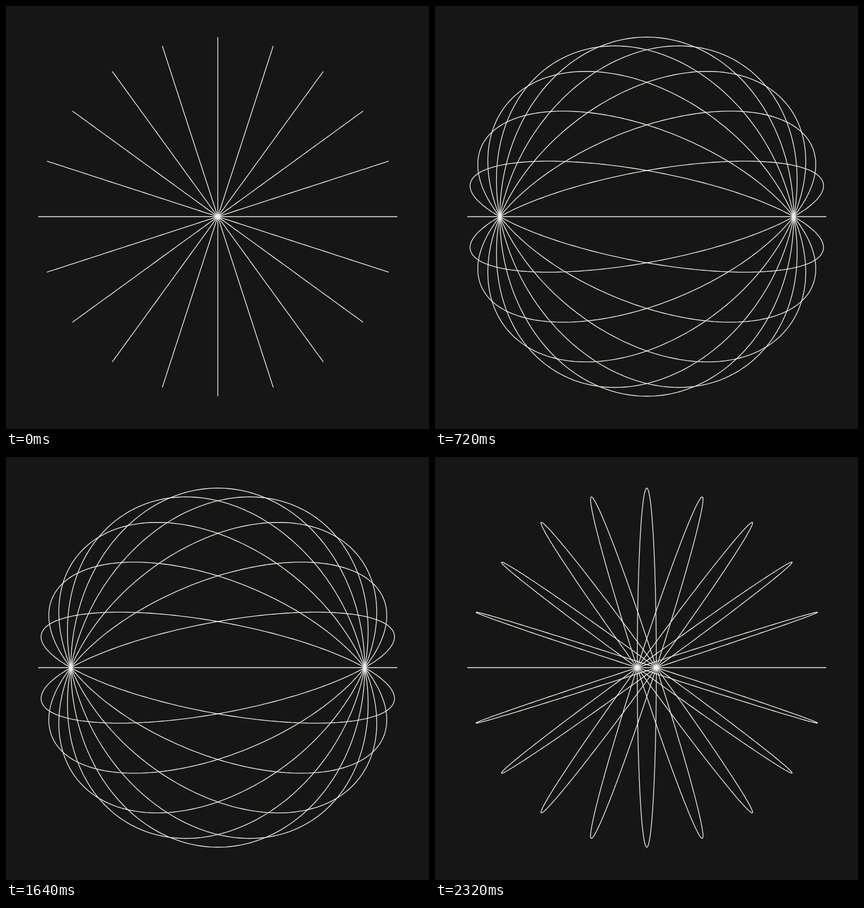
An HTML page with a canvas that plays this animation: 748 by 748 pixels, repeating every 2.36 s.

```html
<!DOCTYPE html>
<html lang="en">
<head>
<meta charset="utf-8">
<title>Rotating meridians</title>
<style>
  html, body { margin: 0; height: 100%; overflow: hidden; background: #161616; }
  canvas { display: block; }
</style>
</head>
<body>
<canvas width="748" height="748"></canvas>
<script>
const ctx = document.querySelector('canvas').getContext('2d');
const CENTER = { x: 374.5, y: 372.5 };
const RADIUS = 317.5;
const CIRCLES = 10;
const SEGMENTS = 240;
const STEP_MS = 40;
const STEPS = 59;

// Great circle through the poles, on a sphere turned about its vertical axis.
function drawMeridian(longitude, turn) {
  ctx.beginPath();
  for (let i = 0; i < SEGMENTS; i++) {
    const p = i / SEGMENTS * 2 * Math.PI;
    const x = Math.cos(longitude) * Math.sin(p) * Math.cos(turn) + Math.cos(p) * Math.sin(turn);
    const y = Math.sin(longitude) * Math.sin(p);
    ctx.lineTo(CENTER.x + RADIUS * x, CENTER.y - RADIUS * y);
  }
  ctx.closePath();
  ctx.stroke();
}

function draw(now) {
  const step = Math.floor(now / STEP_MS) % STEPS;
  ctx.fillStyle = '#161616';
  ctx.fillRect(0, 0, 748, 748);
  ctx.strokeStyle = '#f0f0ee';
  ctx.lineWidth = 1.35;
  ctx.lineJoin = 'bevel';
  for (let k = 0; k < CIRCLES; k++) {
    drawMeridian(k * Math.PI / CIRCLES, step * Math.PI / STEPS);
  }
}

function tick() {
  draw(performance.now());
  requestAnimationFrame(tick);
}
tick();
</script>
</body>
</html>
```
